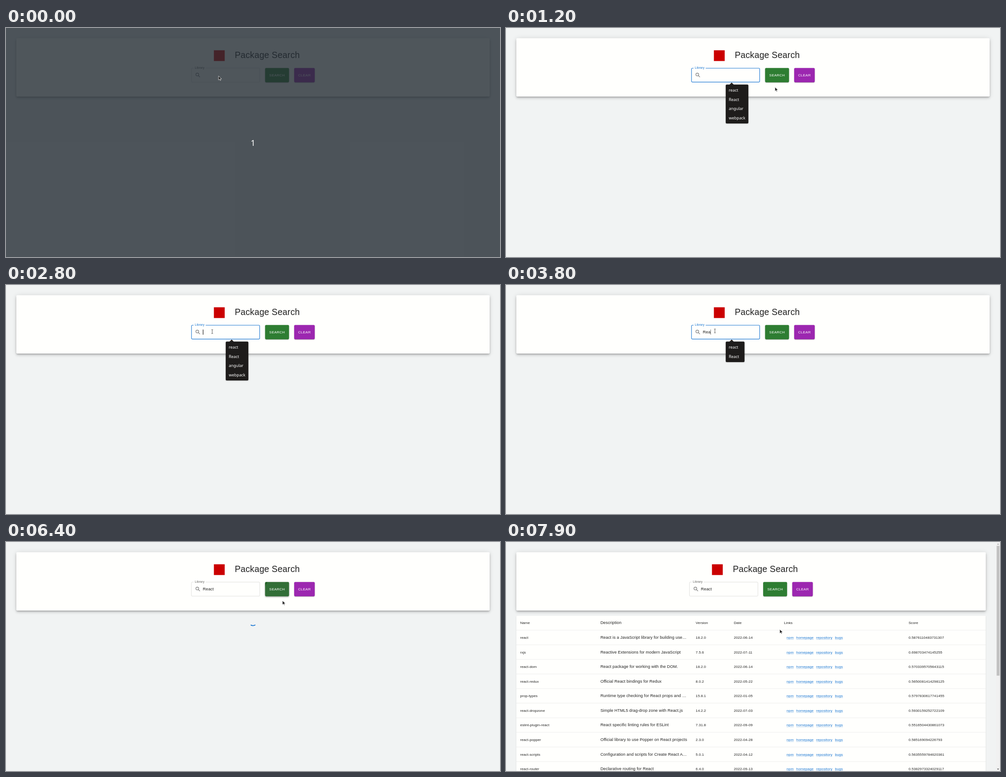
Animation, 1097 px wide and 511 px high, one loop 8 s. Source, as an HTML page:

```html
<!DOCTYPE html>
<html lang="en">
<head>
<meta charset="utf-8">
<title>Package Search</title>
<style>
html, body { margin: 0; width: 100%; height: 100%; overflow: hidden; background: #f1f3f3; }
#stage { position: absolute; left: 0; top: 0; width: 1920px; height: 895px; overflow: hidden;
  transform: scale(.571354); transform-origin: 0 0; background: #f1f3f3;
  font: 16px/24px "Liberation Sans", Arial, sans-serif; color: rgba(0,0,0,.87); --paper: #fffffd; }
#stage div, #stage svg, #stage span { position: absolute; white-space: nowrap; box-sizing: border-box; }
#card { left: 40px; top: 40px; height: 228px; background: var(--paper); border-radius: 4px;
  box-shadow: 0 3px 5px -1px rgba(0,0,0,.2), 0 6px 10px rgba(0,0,0,.14), 0 1px 18px rgba(0,0,0,.12); }
#form { left: 0; top: 0; }
#mark { left: 808px; top: 87px; width: 42px; height: 42px; background: #cb0000; }
#title { left: 889px; top: 84px; font-size: 34px; line-height: 42px; letter-spacing: .00735em; }
#field { left: 720px; top: 156px; width: 267px; height: 56px; border-radius: 4px; }
#label { left: 729px; top: 146px; padding: 0 5px; background: var(--paper); font-size: 12px; line-height: 20px; letter-spacing: .00938em; }
#icon { left: 734px; top: 172px; }
#text { left: 765px; top: 172px; letter-spacing: .00938em; height: 24px; }
#typed { font-weight: 400; }
#caret { left: 100%; top: 2px; width: 1.6px; height: 20px; background: #111; }
.btn { top: 156px; height: 56px; border-radius: 4px; color: #fff; font-size: 14px;
  line-height: 56px; letter-spacing: .02857em; text-align: center;
  box-shadow: 0 3px 1px -2px rgba(0,0,0,.2), 0 2px 2px rgba(0,0,0,.14), 0 1px 5px rgba(0,0,0,.12); }
.btn.up { box-shadow: 0 2px 4px -1px rgba(0,0,0,.2), 0 4px 5px rgba(0,0,0,.14), 0 1px 10px rgba(0,0,0,.12); }
#search { left: 1007px; width: 93px; }
#search span { left: 0; width: 100%; }
#clear { left: 1120px; width: 80px; background: #9c27b0; }
#clip { inset: 0; overflow: hidden; border-radius: 4px; }
#ripple { border-radius: 50%; background: #fff; }
#bubble { left: 854px; top: 221px; padding: 4px 12px; border-radius: 4px; background: #1e1c1b; color: #fff;
  font: 15.5px/36px "Noto Sans", sans-serif; min-width: 73px; transform-origin: 50% 50%;
  box-shadow: 0 1px 4px rgba(0,0,0,.3); }
#bubble::before { content: ""; position: absolute; left: 14px; top: -8px; border: 9px solid transparent;
  border-top: 0; border-bottom: 9px solid #1e1c1b; }
#bubble p { margin: 0; }
#spin { left: 940px; top: 288px; }
#table { left: 40px; top: 288px; width: 1825px; height: 640px; background: var(--paper); border-radius: 4px;
  box-shadow: 0 2px 1px -1px rgba(0,0,0,.2), 0 1px 1px rgba(0,0,0,.14), 0 1px 3px rgba(0,0,0,.12); }
.row { left: 0; width: 100%; height: 57px; border-bottom: 1px solid #e0e0e0; font-size: 14px; line-height: 56px; letter-spacing: .01071em; }
.row .desc { font-size: 16px; letter-spacing: .00938em; }
.row u { color: #1976d2; margin-right: 10px; text-decoration-color: rgba(25,118,210,.55); text-underline-offset: 2px; }
#bar { left: 1905px; top: 0; width: 15px; height: 895px; background: #f1f1f1; }
#thumb { left: 2px; top: 15px; width: 11px; height: 507px; background: #c1c1c1; }
#veil { inset: 0; background: rgba(36,44,52,.8); color: #fff; text-align: center;
  font: 32px/895px "Noto Sans", sans-serif; }
#cursor { left: 0; top: 0; overflow: visible; }
</style>
</head>
<body>
<div id="stage">
  <div id="card"></div>
  <div id="form">
    <div id="mark"></div>
    <div id="title">Package Search</div>
    <div id="field"></div>
    <div id="label">Library</div>
    <svg id="icon" width="24" height="24" fill="none" stroke="#757575" stroke-width="2">
      <circle cx="9.5" cy="9.5" r="5.5"/><path d="M13.5 13.5L19.8 19.8"/>
    </svg>
    <div id="text"><b id="typed"></b><span id="caret"></span></div>
    <div id="search" class="btn"><div id="clip"><div id="ripple"></div></div><span>SEARCH</span></div>
    <div id="clear" class="btn">CLEAR</div>
  </div>
  <svg id="spin" width="40" height="40" viewBox="22 22 44 44">
    <circle id="arc" cx="44" cy="44" r="20.2" fill="none" stroke="#1976d2" stroke-width="3.6"/>
  </svg>
  <div id="table"></div>
  <div id="bubble"></div>
  <div id="bar">
    <div id="thumb"></div>
    <svg width="15" height="895"><path d="M3.5 10l4-4.5 4 4.5z" fill="#a3a3a3"/><path d="M3.5 885l4 4.5 4-4.5z" fill="#505050"/></svg>
  </div>
  <div id="veil">1</div>
  <svg id="cursor" width="20" height="20"><path id="shape"/></svg>
</div>
<script>
const $ = id => document.getElementById(id);
const LOOP = 8000, STEP = 100, UNIT = 1.75;

const rows = `Name|Description|Version|Date|Links|Score
react|React is a JavaScript library for building use…|18.2.0|2022-06-14||0.5876110483731307
rxjs|Reactive Extensions for modern JavaScript|7.5.6|2022-07-11||0.698703474145255
react-dom|React package for working with the DOM.|18.2.0|2022-06-14||0.5703395705643115
react-redux|Official React bindings for Redux|8.0.2|2022-05-22||0.5650081414298125
prop-types|Runtime type checking for React props and …|15.8.1|2022-01-05||0.5797830617741455
react-dropzone|Simple HTML5 drag-drop zone with React.js|14.2.2|2022-07-03||0.5930159252722109
eslint-plugin-react|React specific linting rules for ESLint|7.31.8|2022-09-09||0.5516504430861073
react-popper|Official library to use Popper on React projects|2.3.0|2022-04-28||0.585169094226793
react-scripts|Configuration and scripts for Create React A…|5.0.1|2022-04-12||0.5635559784620361
react-router|Declarative routing for React|6.4.0|2022-09-13||0.5382973324029117`.split('\n');
const columns = [15, 327, 697.5, 845.5, 1040.5, 1524.5];
const links = ['npm', 'homepage', 'repository', 'bugs'].map(s => `<u>${s}</u>`).join('');

$('table').innerHTML = rows.map((row, i) => {
  const cells = row.split('|').map((text, c) => {
    const x = columns[c] + (text ? 0 : 10);
    return `<span class="${c === 1 ? 'desc' : ''}" style="left:${x}px">${text || links}</span>`;
  });
  return `<div class="row" style="top:${i * 57}px">${cells.join('')}</div>`;
}).join('');

// time, x, y of the pointer
const path = [
  [0, 472, 107], [700, 472, 107], [800, 520, 118], [1000, 570, 140], [1300, 611, 128],
  [1400, 608, 122], [1500, 604, 112], [1900, 598, 102], [2300, 598, 102], [2400, 555, 104],
  [2500, 480, 106], [2600, 458, 104], [2800, 458, 104], [3100, 464, 102.5], [4400, 464, 102.5],
  [4500, 480, 112], [4700, 535, 165], [4800, 560, 177], [4900, 590, 160], [5000, 608, 133],
  [5100, 611, 126], [5300, 610, 113], [5600, 610, 111], [6200, 609, 112], [6300, 611, 121],
  [6400, 614, 131], [6800, 607, 188], [7000, 606, 194], [7900, 608, 195], [8000, 608, 195]
];
const typing = [3500, 3600, 3800, 4000, 4100];
const focusSpans = [[500, 1300], [2500, 5000]];
const hoverSpans = [[1400, 2400], [5200, 6400]];
const bubbleSpans = [[500, 1200], [2500, 4900]];
const shapes = {
  arrow: 'M0 0V16L4 12.5 6.5 18 9 17 6.5 11.5H12Z',
  hand: 'M-2 9V2q0-2 2-2t2 2v5l5 1q2 .5 2 3l-1 6H0L-5 11q-1-2 1-2z',
  beam: 'M-3-8q3 0 3 2V6q0 2-3 2M3-8q-3 0-3 2M0 6q0 2 3 2'
};

const clamp = v => Math.max(0, Math.min(1, v));
const smooth = v => v * v * (3 - 2 * v);
const mix = (a, b, k) => a + (b - a) * k;
const within = (t, spans) => spans.some(([a, b]) => t >= a && t < b);
const fade = (t, spans, rise, fall) =>
  spans.reduce((sum, [a, b]) => sum + clamp((t - a) / rise) - clamp((t - b) / fall), 0);
const show = (id, on) => $(id).style.display = on ? '' : 'none';

function pointer(t) {
  const i = path.findIndex(p => p[0] > t);
  const [a, b] = [path[i - 1], path[i]];
  const k = (t - a[0]) / (b[0] - a[0]);
  return [mix(a[1], b[1], k), mix(a[2], b[2], k)];
}

function drawPointer(x, y, kind) {
  const s = $('shape'), beam = kind === 'beam';
  s.setAttribute('d', shapes[kind]);
  s.setAttribute('fill', beam ? 'none' : '#222');
  s.setAttribute('stroke', beam ? '#444' : '#fff');
  s.setAttribute('stroke-width', beam ? 1.6 : 1.2);
  $('cursor').style.transform = `translate(${x * UNIT}px,${y * UNIT}px)`;
}

function drawField(t, over) {
  const focus = within(t, focusSpans);
  $('field').style.border = focus ? '2px solid #1976d2' : `1px solid rgba(0,0,0,${over ? .87 : .23})`;
  $('label').style.color = focus ? '#1976d2' : 'rgba(0,0,0,.6)';
  $('typed').textContent = 'React'.slice(0, typing.filter(k => k <= t).length);
  const last = Math.max(...[500, 2500, ...typing].filter(k => k <= t));
  show('caret', focus && Math.floor((t - last) / 500) % 2 === 0);
}

function drawBubble(t) {
  const o = fade(t, bubbleSpans, 100, 220);
  const words = t < 3500 ? ['react', 'React', 'angular', 'webpack'] : ['react', 'React'];
  show('bubble', o > 0);
  $('bubble').innerHTML = words.map(w => `<p>${w}</p>`).join('');
  $('bubble').style.opacity = o;
  $('bubble').style.transform = `scale(${mix(.94, 1, o)})`;
}

function drawSearch(t) {
  const h = fade(t, hoverSpans, 250, 250), dt = t - 6200;
  const b = $('search');
  b.style.background = `rgb(${mix(46, 27, h)},${mix(125, 94, h)},${mix(50, 32, h)})`;
  b.classList.toggle('up', h > .5);
  const r = 22 + .21 * dt, on = dt >= 0 && dt < 300;
  show('ripple', on);
  if (on) Object.assign($('ripple').style, {
    left: 60 - r + 'px', top: 40 - r + 'px', width: 2 * r + 'px', height: 2 * r + 'px',
    opacity: .3 * (1 - dt / 300)
  });
}

function drawSpinner(t) {
  show('spin', t >= 6200 && t < 7100);
  const p = clamp((t - 6200) / 1400);
  const grow = smooth(clamp(p * 2)), slide = smooth(clamp(p * 2 - 1));
  $('spin').style.transform = `rotate(${p * 360}deg)`;
  $('arc').style.strokeDasharray = `${mix(1, 100, grow)}px 200px`;
  $('arc').style.strokeDashoffset = -15 * grow - 110 * slide + 'px';
}

function render(t) {
  const [x, y] = pointer(t);
  const loaded = t >= 7100, inRow = y > 89 && y < 121.5;
  const overField = t >= 100 && inRow && x > 411 && x < 564;
  const overSearch = inRow && x > 575 && x < 629;
  $('card').style.width = (loaded ? 1825 : 1840) + 'px';
  $('form').style.transform = `translateX(${loaded ? -7.5 : 0}px)`;
  show('table', loaded);
  show('bar', loaded);
  show('veil', t < 100);
  drawField(t, overField);
  drawBubble(t);
  drawSearch(t);
  drawSpinner(t);
  drawPointer(x, y, overField ? 'beam' : overSearch ? 'hand' : 'arrow');
}

const start = performance.now();
let shown = -1;
function tick() {
  const t = Math.floor((performance.now() - start) % LOOP / STEP) * STEP;
  if (t !== shown) render(shown = t);
  requestAnimationFrame(tick);
}
tick();
</script>
</body>
</html>
```
